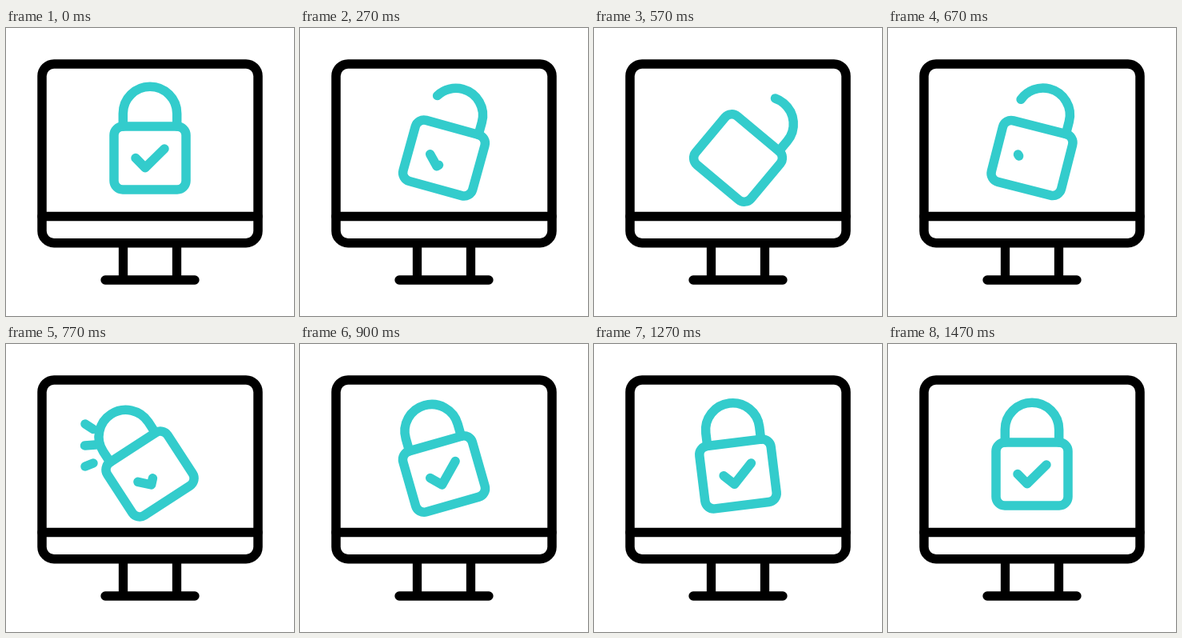
Recreate the animation shown at these times as an HTML page. Size 360 px wide and 360 px high, loop 1.67 s.

```html
<!DOCTYPE html>
<html lang="en">
<head>
<meta charset="utf-8">
<title>Computer lock</title>
<style>
  html, body { margin: 0; width: 100%; height: 100%; overflow: hidden; background: #fff; }
  svg { display: block; width: 100vw; height: 100vh; }
</style>
</head>
<body>
<svg viewBox="0 0 360 360" fill="none" stroke-width="11.5" stroke-linecap="round" stroke-linejoin="round">
  <g stroke="#000">
    <rect x="45" y="45" width="270" height="223.7" rx="15"/>
    <path d="M45 235.5H315M146.5 269V315M213.5 269V315M124 315H236" stroke-width="11.3"/>
  </g>
  <g stroke="#33cccc">
    <path id="sparks"/>
    <g id="lock">
      <rect x="135" y="123" width="90" height="79" rx="11"/>
      <path id="shackle" pathLength="1" d="M213.7 123V107A33.7 33.7 0 0 0 146.3 107V123"/>
      <path id="check" pathLength="1" d="M162 162.5L174 174.7L198 151"/>
    </g>
  </g>
</svg>
<script>
const LOOP = 1670, STEP = 100 / 3, LAST = 44;
const $ = id => document.getElementById(id);
const lock = $('lock'), shackle = $('shackle'), check = $('check'), sparks = $('sparks');

// [step, degrees]: a swing that dies away
const swing = [[0, 0], [1, 0], [17.5, 40], [24, -38], [31, 17.9], [38, -7], [44, 0]];
// [inner x, inner y, outer x, outer y]
const rays = [[109, 106.5, 99, 100], [112, 126, 98.5, 127], [109, 149, 99, 153]];

const ramp = (n, a, b) => {
  const u = Math.min(1, Math.max(0, (n - a) / (b - a)));
  return u * u * (3 - 2 * u);
};

function angleAt(n) {
  let i = 1;
  while (i < swing.length - 1 && n > swing[i][0]) i++;
  const [a, from] = swing[i - 1], [b, to] = swing[i];
  return from + (to - from) * ramp(n, a, b);
}

function trim(path, part) {
  path.setAttribute('visibility', part > 0.002 ? 'visible' : 'hidden');
  path.setAttribute('stroke-dasharray', part < 1 ? part + ' 2' : 'none');
}

function raysAt(n) {
  const tail = ramp(n, 23, 27), head = ramp(n, 20, 23);
  if (head <= tail) return '';
  return rays.map(([x, y, ox, oy]) => {
    const at = k => (x + (ox - x) * k) + ' ' + (y + (oy - y) * k);
    return 'M' + at(tail) + 'L' + at(head);
  }).join('');
}

function draw(ms) {
  const n = Math.min(LAST, Math.floor((ms % LOOP + 3.4) / STEP));
  const open = ramp(n, 0, 14);
  lock.setAttribute('transform', `rotate(${angleAt(n)} 180 162.5)`);
  trim(shackle, 1 - 0.41 * (open - ramp(n, 17, 23)));
  trim(check, 1 - open + ramp(n, 19, 27));
  sparks.setAttribute('d', raysAt(n));
}

const start = performance.now();
function tick() {
  draw(performance.now() - start);
  requestAnimationFrame(tick);
}
tick();
</script>
</body>
</html>
```
